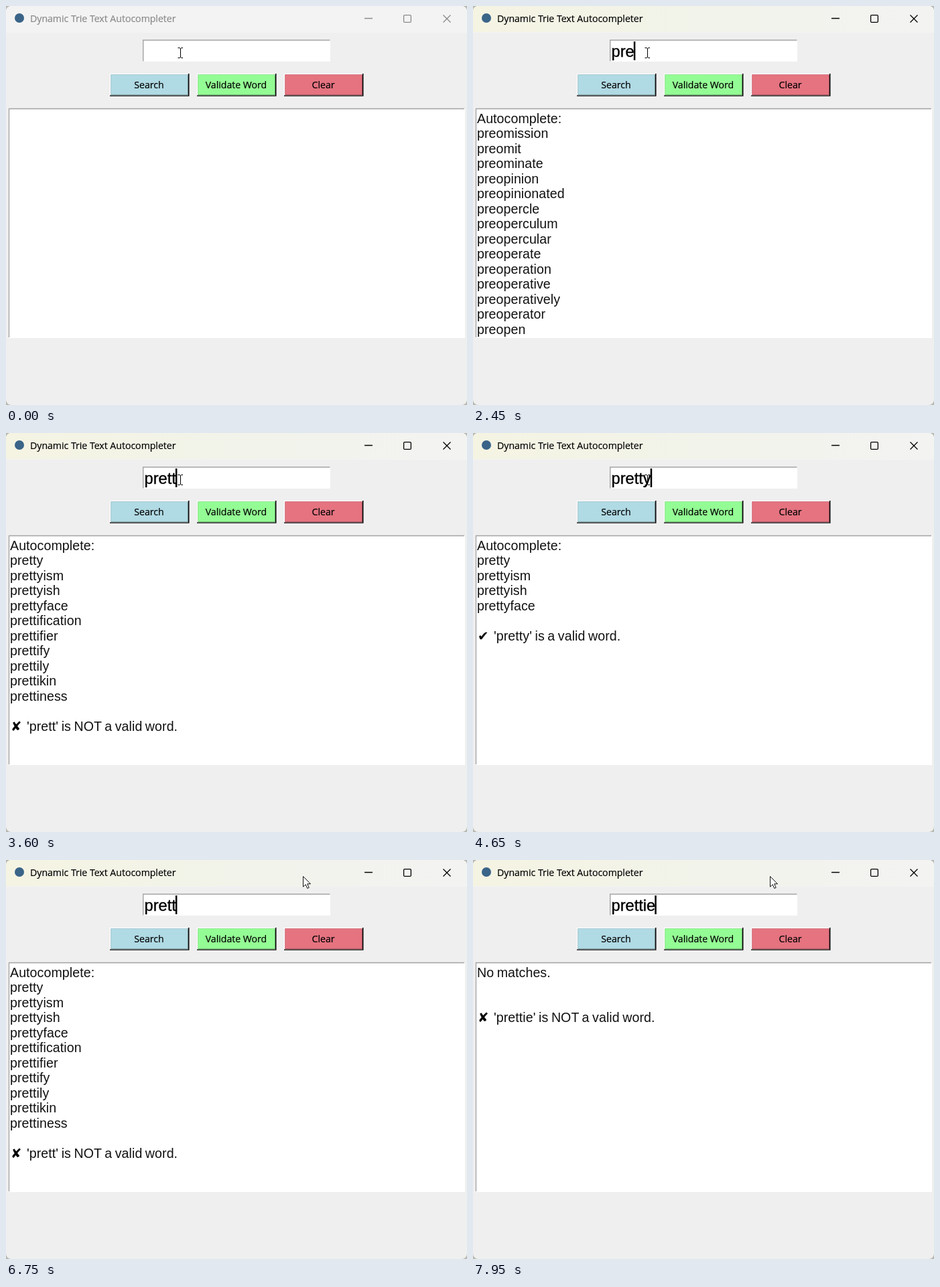
Recreate the animation shown at these times as an HTML page. Size 688 px wide and 596 px high, loop 8000 ms.

```html
<!DOCTYPE html>
<html lang="en">
<head>
<meta charset="utf-8">
<title>Autocompleter</title>
<style>
  html, body { margin: 0; width: 100%; height: 100%; overflow: hidden; background: #b9b9b0; }
  svg { display: block; }
  text { white-space: pre; }
  .ui { font: 14.1px "Open Sans", "Noto Sans", sans-serif; stroke-width: .2; }
  .out { font: 19.6px "Liberation Sans", Arial, sans-serif; fill: #111; letter-spacing: .07px; word-spacing: -1px; }
  .mark { font: 19.6px "DejaVu Sans", sans-serif; fill: #000; }
  .entry { font: 23.6px "Liberation Sans", Arial, sans-serif; fill: #000; stroke: #000; stroke-width: .4; }
</style>
</head>
<body>
<svg width="688" height="596" viewBox="0 0 688 596">
  <defs>
    <linearGradient id="tint">
      <stop offset="0" stop-color="#f5f4e3"/>
      <stop offset=".45" stop-color="#f2f3e9"/>
      <stop offset="1" stop-color="#f3f3f2"/>
    </linearGradient>
    <clipPath id="window"><rect width="688" height="596" rx="8"/></clipPath>
  </defs>
  <g clip-path="url(#window)">
    <rect width="688" height="596" fill="#efefef"/>
    <rect width="688" height="40" fill="#f3f3f3"/>
    <rect id="bar" width="688" height="39" fill="url(#tint)"/>
  </g>

  <circle cx="20" cy="18" r="7" fill="#3a6488"/>
  <text id="title" class="ui" x="36" y="24">Dynamic Trie Text Autocompleter</text>
  <g id="controls" fill="none" stroke-width="1.3">
    <path d="M535 18.5h12M652.5 13.5l11 11m0-11l-11 11"/>
    <rect x="593.6" y="13.6" width="10.8" height="10.8" rx="1.5"/>
  </g>

  <rect x="204" y="50" width="280" height="33" fill="#fff"/>
  <path d="M204.7 82.5V51H483.5" fill="none" stroke="#a2a2a2" stroke-width="1.4"/>
  <text id="entry" class="entry" x="206.6" y="76"></text>
  <rect id="caret" y="53" width="2.5" height="28"/>

  <g id="buttons"></g>

  <rect x="4" y="153" width="681" height="343" fill="#fff"/>
  <path d="M4.5 495V153.5H684" fill="none" stroke="#a2a2a2" stroke-width="1.3"/>
  <g id="output"></g>

  <path id="beam" fill="none" stroke="#000" d="M-3.5 -7.5H-1L0.5 -6.5L2 -7.5H4M.5 -6.5V6.5M-3.5 7.5H-1L.5 6.5L2 7.5H4"/>
  <path id="arrow" fill="#fff" stroke="#111" stroke-linejoin="round" d="M.5 .5V16L4.2 12.6L6.8 18.4L9.2 17.3L6.7 11.7H11.5Z"/>
</svg>
<script>
const LOOP = 8000, LINE = 22.5;
const $ = id => document.getElementById(id);

function add(parent, tag, attrs, text = "") {
  const node = document.createElementNS("http://www.w3.org/2000/svg", tag);
  for (const key in attrs) node.setAttribute(key, attrs[key]);
  node.textContent = text;
  parent.append(node);
}

// raised buttons: light top-left edge, black bottom-right edge with a darker inner line
[["Search", 155, "#b0dae4", "#6b8488"], ["Validate Word", 285, "#94fc94", "#5a975a"], ["Clear", 415, "#e57380", "#89454d"]]
  .forEach(([label, x, face, shade]) => {
    const g = $("buttons");
    const box = (dx, dy, width, height, fill) =>
      add(g, "rect", { x: x + dx, y: 101 + dy, width, height, fill });
    box(0, 0, 118.5, 33.8, "#0c0c0c");
    box(0, 0, 117, 32.4, "#fff");
    box(1.4, 1.4, 115.6, 31, shade);
    box(1.4, 1.4, 114.6, 30, face);
    add(g, "text", { class: "ui", x: x + 58.5, y: 122.6, "text-anchor": "middle", fill: "#000", stroke: "#000" }, label);
  });

const split = s => s.split(" ");
const open = split("preomission preomit preominate preopinion preopinionated preopercle preoperculum " +
  "preopercular preoperate preoperation preoperative preoperatively preoperator preopen");
const yWords = split("pretty prettyism prettyish prettyface");
const iWords = split("prettification prettifier prettify prettily prettikin prettiness");
const both = yWords.concat(iWords);

// time, typed text, suggestions
const steps = [
  [0, "", null],
  [1950, "p", open],
  [2200, "pr", open],
  [2450, "pre", open],
  [3100, "pret", both.concat(split("pretest pretested pretesting pretext"))],
  [3350, "prett", both],
  [4100, "pretty", yWords],
  [5700, "prett", both],
  [7250, "pretti", iWords],
  [7500, "prettie", []]
];

let shown = null;
function show(step) {
  if (step === shown) return;
  shown = step;
  const [, typed, words] = step, out = $("output");
  $("entry").textContent = typed;
  const width = typed ? $("entry").getComputedTextLength() : 0;
  $("caret").setAttribute("x", typed ? 205.7 + width : 205);
  out.replaceChildren();
  if (!words) return;

  const line = (row, text, x = 6, cls = "out") =>
    add(out, "text", { class: cls, x, y: 174.5 + row * LINE }, text);
  line(0, words.length ? "Autocomplete:" : "No matches.");
  words.forEach((word, i) => line(i + 1, word));
  const row = Math.max(words.length + 2, 3);
  if (row > 14) return;
  const valid = words.includes(typed);
  line(row, valid ? "✔" : "✘", 7, "mark");
  line(row, `'${typed}' is ${valid ? "a" : "NOT a"} valid word.`, 31);
}

const ramp = (t, from, to) => Math.min(1, Math.max(0, (t - from) / (to - from)));

function draw(t) {
  const step = steps.findLast(s => s[0] <= t);
  show(step);

  const focus = ramp(t, 1400, 1700);
  const grey = Math.round(138 * (1 - focus));
  const ink = `rgb(${grey},${grey},${grey})`;
  $("bar").setAttribute("opacity", focus);
  $("title").setAttribute("fill", ink);
  $("title").setAttribute("stroke", ink);
  $("controls").setAttribute("stroke", ink);

  const since = t - Math.max(step[0], 1450);
  $("caret").setAttribute("visibility", since >= 0 && since % 900 < 600 ? "visible" : "hidden");

  const m = ramp(t, 4900, 5250), k = m * m * (3 - 2 * m);
  const x = 260 + 183 * k, y = 70 - 46 * k;
  const inside = y > 50;
  for (const [id, on] of [["beam", inside], ["arrow", !inside]]) {
    $(id).setAttribute("transform", `translate(${x} ${y})`);
    $(id).setAttribute("visibility", on ? "visible" : "hidden");
  }
}

const start = performance.now();
function tick() {
  draw((performance.now() - start) % LOOP);
  requestAnimationFrame(tick);
}
tick();
</script>
</body>
</html>
```
